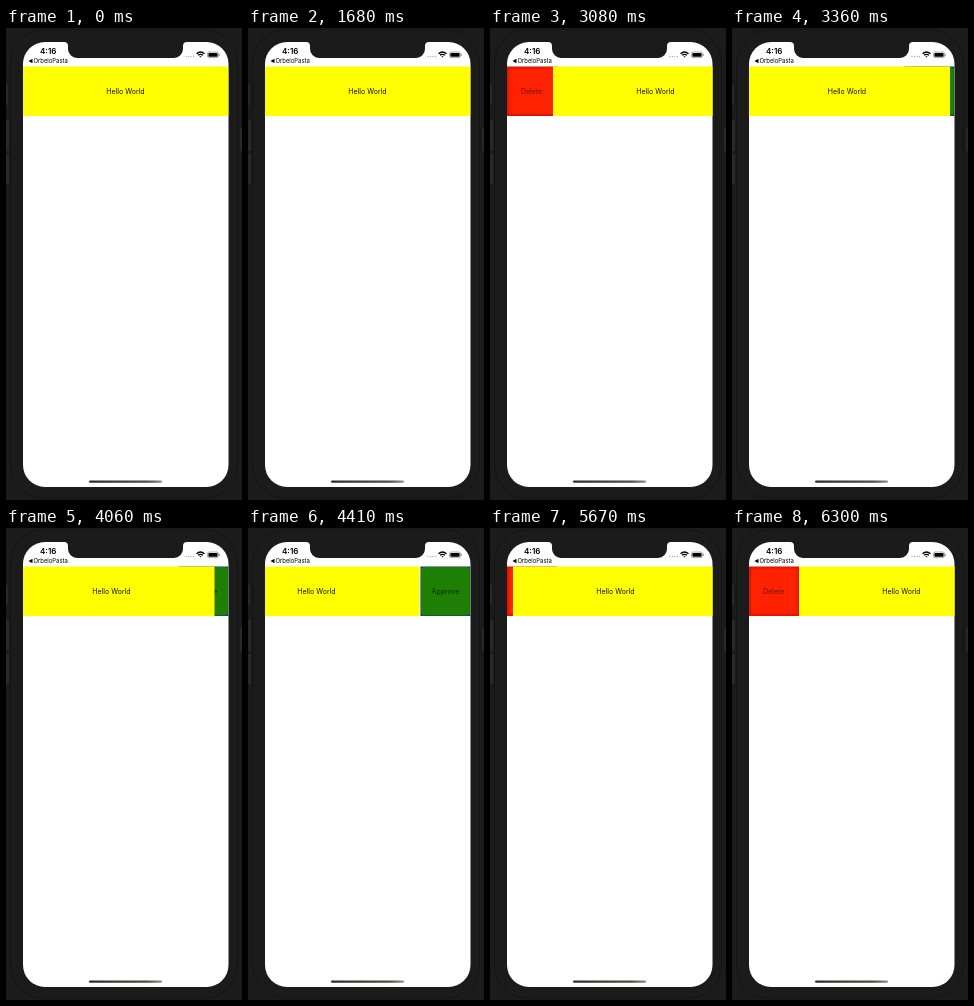
An HTML page that plays this animation: 236x472 px, repeating every 6.37 s.

```html
<!DOCTYPE html>
<html lang="en">
<head>
<meta charset="utf-8">
<title>Swipeable row</title>
<style>
  html, body { margin: 0; width: 100%; height: 100%; overflow: hidden; background: #1b1b1b; }
  svg { display: block; width: 236px; height: 472px; }
  text { font: 7px Inter, "Liberation Sans", sans-serif; }
  .label { text-anchor: middle; }
</style>
</head>
<body>
<svg viewBox="0 0 236 472">
  <defs>
    <clipPath id="screen"><rect x="17" y="14" width="205.5" height="445" rx="22"/></clipPath>
    <filter id="soft"><feGaussianBlur stdDeviation="1.3"/></filter>
    <linearGradient id="bar">
      <stop offset="0" stop-color="#292d28"/>
      <stop offset=".8" stop-color="#4b5048"/>
      <stop offset="1" stop-color="#899087"/>
    </linearGradient>
  </defs>

  <!-- phone body and side buttons -->
  <rect width="236" height="472" fill="#1b1b1b"/>
  <rect x="4.5" y="1.5" width="227" height="469" rx="34" fill="none" stroke="#131313"/>
  <g fill="#292929">
    <rect y="57" width="2" height="20"/>
    <rect y="92" width="3" height="31"/>
    <rect y="126" width="3" height="30"/>
    <rect x="234" y="100" width="2" height="23"/>
  </g>

  <g clip-path="url(#screen)">
    <rect x="17" y="14" width="206" height="445" fill="#fff"/>

    <!-- actions beneath the row -->
    <g id="remove">
      <rect x="17" y="38.5" width="50" height="49.5" fill="#d81800"/>
      <rect x="19" y="40.5" width="46" height="45.5" fill="#ff2200" filter="url(#soft)"/>
      <text class="label" x="41.5" y="65.5" fill="#701400">Delete</text>
    </g>
    <g id="approve">
      <rect x="172.5" y="38.5" width="50" height="49.5" fill="#102f78"/>
      <rect x="173" y="39" width="49" height="48.5" rx="3" fill="#1f7f05"/>
      <text class="label" x="197.5" y="65.5" fill="#0a3000">Approve</text>
    </g>
    <g id="row">
      <rect x="17" y="38.5" width="205.5" height="49.5" fill="#ff0"/>
      <text class="label" x="119.5" y="65.5" fill="#111100">Hello World</text>
    </g>

    <!-- status bar -->
    <path d="M58 13V14q4 0 4 4v3a9 9 0 0 0 9 9h97a9 9 0 0 0 9-9v-3q0-4 4-4v-1z" fill="#1b1b1b"/>
    <text x="34" y="26" style="font-size:8px;font-weight:600">4:16</text>
    <path d="M22.5 33l4-2.2v4.4z"/>
    <text x="27.5" y="35" style="font-size:5.9px">OrbeloPasta</text>
    <g fill="#aaa">
      <circle cx="180" cy="28.5" r=".7"/><circle cx="182.5" cy="28.5" r=".7"/>
      <circle cx="185" cy="28.5" r=".7"/><circle cx="187.5" cy="28.5" r=".7"/>
    </g>
    <g fill="none" stroke="#000" stroke-width="1.3">
      <path d="M190.5 25.7q4-3.4 8 0M192 27.3q2.5-2 5 0"/>
      <path d="M193.3 28.2h2.4l-1.2 1.3z" fill="#000" stroke="none"/>
    </g>
    <rect x="201.5" y="24" width="11" height="5.6" rx="1.6" fill="none" stroke="#888" stroke-width=".7"/>
    <rect x="202.4" y="24.9" width="9.2" height="3.8" rx=".8"/>
    <path d="M213.5 26v1.8" stroke="#888" stroke-width=".8"/>

    <rect x="83" y="452.4" width="73" height="2.4" rx="1.2" fill="url(#bar)"/>
  </g>
</svg>
<script>
  const LOOP = 6370, STEP = 70;

  // [time in ms, horizontal offset of the row]
  const track = [
    [0, 0], [1750, 0], [1820, 3], [1960, 14], [2100, 37], [2170, 46], [2240, 49.7], [2380, 50.6], [2520, 50],
    [3010, 50], [3080, 46], [3150, 33], [3220, 15], [3290, 1], [3360, -4.5], [3500, -4], [3710, -2],
    [3850, -4], [4060, -14], [4200, -32], [4340, -48], [4410, -51], [4480, -51.2], [4760, -50],
    [5320, -50], [5390, -49.8], [5460, -43], [5600, -14], [5740, 26], [5880, 46], [6020, 49.6], [6090, 50],
    [LOOP, 50]
  ];

  function offsetAt(time) {
    const i = track.findIndex(([t]) => t > time);
    const [t0, x0] = track[i - 1], [t1, x1] = track[i];
    return x0 + (x1 - x0) * (time - t0) / (t1 - t0);
  }

  const byId = id => document.getElementById(id);
  const start = performance.now();

  function draw() {
    const elapsed = (performance.now() - start) % LOOP;
    const x = offsetAt(Math.floor(elapsed / STEP) * STEP);
    byId("row").setAttribute("transform", `translate(${x})`);
    byId("remove").setAttribute("visibility", x > 0 ? "visible" : "hidden");
    byId("approve").setAttribute("visibility", x < 0 ? "visible" : "hidden");
    requestAnimationFrame(draw);
  }
  draw();
</script>
</body>
</html>
```
